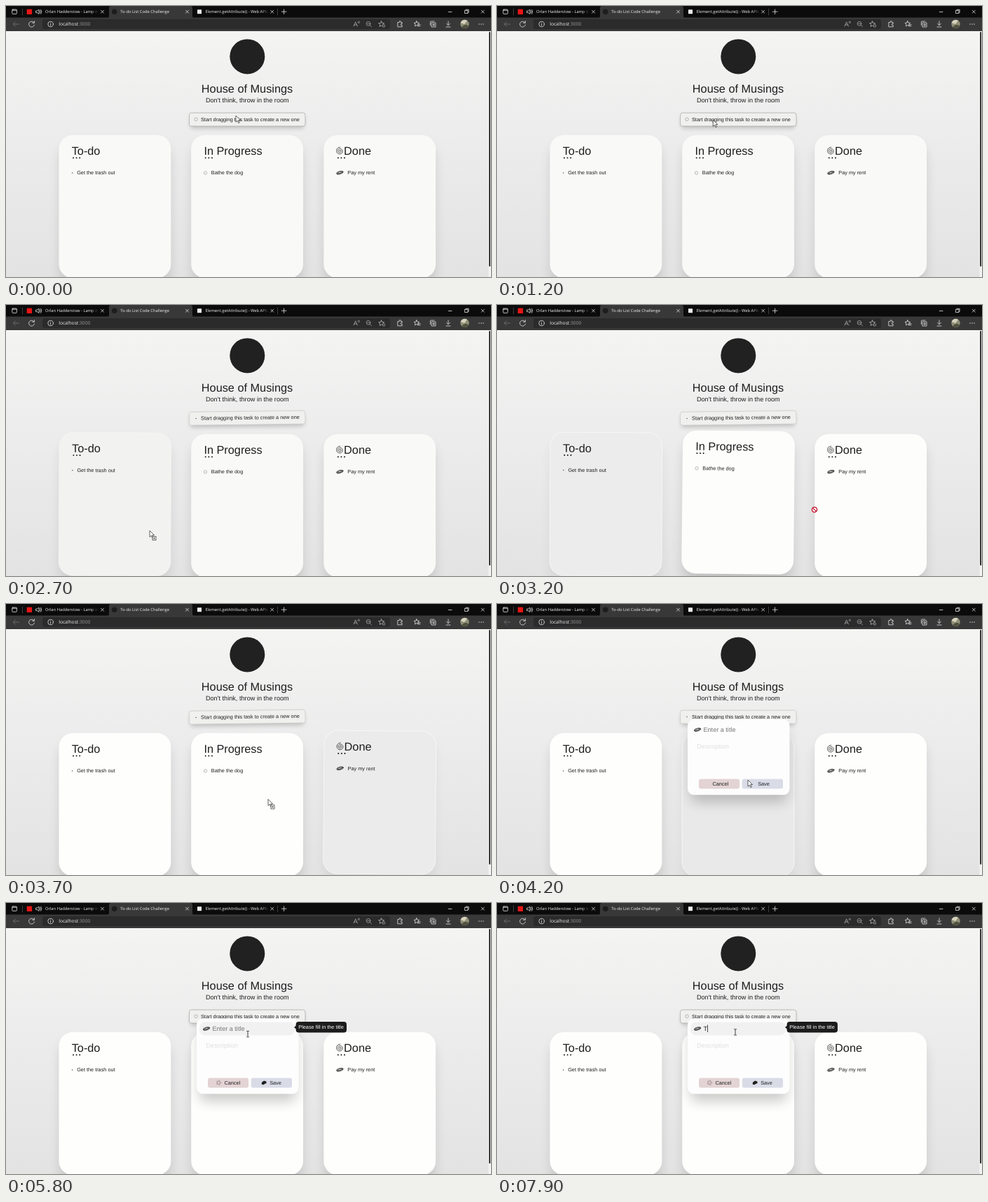
Write an HTML page that moves like this. It is 692 by 388 pixels and loops after 8000 ms.

```html
<!DOCTYPE html>
<html lang="en">
<head>
<meta charset="utf-8">
<title>To-do List Code Challenge</title>
<style>
  html, body { margin: 0; width: 100%; height: 100%; overflow: hidden; background: #eee; }
  #stage { display: block; width: 692px; height: 388px; }
  text { font-family: "Liberation Sans", Arial, sans-serif; fill: #1e1e1e; text-rendering: geometricPrecision; white-space: pre; }
  .ui text { font-family: "Open Sans", "Noto Sans", sans-serif; font-size: 5.8px; fill: #f2f2f2; }
  .line { fill: none; stroke: #e4e4e4; stroke-width: .8; stroke-linecap: round; stroke-linejoin: round; }
  .dim { stroke: #777; }
  .head { font-size: 16.3px; }
  .small { font-size: 7.3px; }
  .field { font-size: 9.1px; }
  .ring { fill: none; stroke: #8d8d8d; stroke-width: .6; }
  .ink { fill: none; stroke: #2a2a2a; stroke-width: .7; stroke-linecap: round; }
  .soft { filter: blur(9px); }
  .near { filter: blur(3px); }
</style>
</head>
<body>
<svg id="stage" viewBox="0 0 692 388" xmlns="http://www.w3.org/2000/svg">
  <defs>
    <linearGradient id="page" x2="0" y2="1">
      <stop stop-color="#f4f4f3"/><stop offset=".45" stop-color="#ececec"/><stop offset="1" stop-color="#e3e3e3"/>
    </linearGradient>
    <linearGradient id="fade"><stop stop-color="#0b0b0b" stop-opacity="0"/><stop offset="1" stop-color="#0b0b0b"/></linearGradient>
    <g id="cross"><path class="line" d="M-2-2L2 2M2-2L-2 2"/></g>
    <g id="oval" class="ink">
      <ellipse rx="4.9" ry="2" transform="rotate(-14)"/>
      <ellipse rx="4.2" ry="1.2" transform="rotate(-20)"/>
      <path d="M-3.6 1.3Q0 1.4 3.8-1.2"/>
    </g>
    <g id="dots"><circle cx="2" r=".95"/><circle cx="6.6" r=".95"/><circle cx="11.2" r=".95"/></g>
  </defs>

  <rect y="36" width="692" height="352" fill="url(#page)"/>
  <circle cx="344.3" cy="72.4" r="25" fill="#212121"/>
  <text class="head" x="344" y="124.3" text-anchor="middle">House of Musings</text>
  <text x="344.3" y="137.8" text-anchor="middle" font-size="9.17">Don't think, throw in the room</text>

  <g id="cards"></g>

  <g id="task">
    <rect class="near" x="263" y="157" width="162" height="18" rx="4" fill="#000" opacity=".2"/>
    <rect id="taskBox" x="261.5" y="153" width="165.5" height="19" rx="3" fill="#f0f1ef" stroke-width=".8"/>
    <circle id="taskRing" class="ring" cx="271" cy="162.2" r="2.3"/>
    <circle id="taskDot" cx="271" cy="162.4" r=".75" fill="#555"/>
    <text class="small" x="278" y="164.6">Start dragging this task to create a new one</text>
  </g>

  <g id="modal">
    <rect class="soft" x="276" y="180" width="138" height="104" rx="9" fill="#000" opacity=".2"/>
    <rect x="272" y="165.3" width="145.5" height="108" rx="9" fill="#fdfdfd"/>
    <rect id="pill" x="276" y="170.5" width="136" height="19" rx="8" fill="#f1f1f1"/>
    <use href="#oval" x="286" y="180"/>
    <text id="entry" class="field" x="294.5" y="183"></text>
    <rect id="caret" y="174.5" width=".8" height="10.5" fill="#222"/>
    <text class="field" x="285.3" y="207.3" style="fill:#dfdfdf">Description</text>
    <rect x="288" y="250.4" width="58" height="14" rx="3" fill="#e3d3d4"/>
    <rect x="349.7" y="250.4" width="58.3" height="14" rx="3" fill="#d9dce7"/>
    <text id="cancel" class="small" y="260">Cancel</text>
    <text id="save" class="small" y="260">Save</text>
    <g id="marks">
      <path id="spark" class="ink" transform="translate(303.4 257.3)" style="stroke:#695557;stroke-width:.6"/>
      <path d="M364.6 259.3C364.5 256 367 254.4 369.5 254.8C372 255.2 372.4 257.7 370.7 258.4C368.8 258.6 368 260.3 366.4 260.2Z" fill="#202020"/>
    </g>
  </g>

  <g id="tip">
    <path d="M411 178L414.5 175V181Z" fill="#1c1c1c"/>
    <rect x="413.6" y="170" width="72.4" height="15.4" rx="4" fill="#1c1c1c"/>
    <text class="small" x="417.3" y="180.4" style="fill:#fff">Please fill in the title</text>
  </g>

  <rect x="688.5" y="36" width="3.5" height="352" fill="#f3f3f3"/>
  <rect x="689.2" y="37" width="1.9" height="336" rx=".9" fill="#202020"/>

  <g class="ui">
    <rect width="692" height="17" fill="#0b0b0b"/>
    <rect y="16.5" width="692" height="19.5" fill="#383838"/>
    <path d="M145 17Q147 17 147 14V3Q147 0 150 0H263Q266 0 266 3V14Q266 17 268 17Z" fill="#383838"/>
    <rect x="52" y="19" width="496" height="14" rx="3" fill="#2b2b2b"/>

    <rect class="line" x="8.8" y="5" width="6.6" height="6.4" rx="1"/>
    <path class="line" d="M9 6.2H15" stroke-width="1.6"/>
    <path class="line dim" d="M23.5 4V13" opacity=".6"/>
    <rect x="29.7" y="4.6" width="7.4" height="7.4" fill="#e81616"/>
    <path class="line" d="M43 7H44.6L47 5V11.5L44.6 9.6H43ZM48.6 6.7Q49.8 8.2 48.6 9.8M49.8 5.2Q52 8.2 49.8 11.3"/>
    <svg x="56" width="76" height="17"><text y="10.2">Orlan Hadderstow - Lamp in Winter</text></svg>
    <rect x="121" width="11" height="16" fill="url(#fade)"/>
    <circle cx="154.7" cy="8.3" r="3.8" fill="#1d1d1d"/>
    <text x="163.3" y="10.2">To-do List Code Challenge</text>
    <rect x="273" y="5.2" width="6" height="6" fill="#f0f0f0"/>
    <svg x="284.5" width="90" height="17"><text y="10.2">Element.getAttribute() - Web APIs</text></svg>
    <rect x="364" width="11" height="16" fill="url(#fade)"/>
    <use href="#cross" x="137.5" y="8.2"/><use href="#cross" x="258.5" y="8.2"/><use href="#cross" x="379.7" y="8.2"/>
    <path class="line dim" d="M387.5 4V13" opacity=".6"/>
    <path class="line" d="M393.3 8.2H400M396.6 4.9V11.5M631.3 8.5H636M654.8 6.3H659V10.5H654.8ZM656 6.2V5.2H660.1V9.3H659.2"/>
    <use href="#cross" x="680.3" y="8.2"/>

    <path class="line dim" d="M18.5 26H10.3L13.5 22.8M10.3 26L13.5 29.2"/>
    <path class="line" d="M40 24A4 4 0 1 0 40.5 27M40.4 21.5V24.2H37.6" stroke-width="1"/>
    <circle class="line" cx="63.6" cy="26" r="3.8"/>
    <path class="line" d="M63.6 25.6V28M63.6 24V24.1"/>
    <text x="75.2" y="28.4" style="font-size:6.7px">localhost<tspan fill="#9a9a9a">:3000</tspan></text>
    <path class="line" d="M496 29L498.7 22.8L501.4 29M497 27H500.4M502.3 22.4Q503.2 23.2 502.3 24.2M503.8 21.8Q505 23.2 503.8 24.7" style="stroke:#aaa"/>
    <g style="opacity:.65"><circle class="line" cx="517" cy="25.3" r="2.9"/><path class="line" d="M519.2 27.5L521.6 29.8M515.6 25.3H518.4"/></g>
    <path class="line" id="star1" style="stroke:#bbb"/>
    <circle cx="539" cy="28.4" r="2.2" fill="#888"/><path class="line" d="M537.9 28.4H540.1M539 27.3V29.5" style="stroke:#222"/>
    <path class="line" d="M559.2 23.5H561.2Q560.6 21.5 562.2 21.5T563.3 23.5H565.2V25.4Q563.2 24.9 563.2 26.4T565.2 27.5V29.8H559.2Z"/>
    <path class="line" id="star2"/>
    <path class="line" d="M588.4 26.6H591M588 28.6H591"/>
    <path class="line" d="M605.4 27.5V22.8Q605.4 22 606.2 22H611M607.4 24H613V30H607.4ZM610.2 25.4V28.6M608.6 27H611.8"/>
    <path class="line" d="M631 21.8V27.4M628.5 25.2L631 27.7L633.5 25.2M628 30H634"/>
    <circle cx="654.5" cy="26" r="6.2" fill="#8f9077"/>
    <path d="M648.6 24A6.2 6.2 0 0 1 658 20.9L654 26Z" fill="#d6d2bd"/>
    <path d="M650 30.2Q655 24 660 28.7A6.2 6.2 0 0 1 650 30.2Z" fill="#51513f"/>
    <g fill="#e6e6e6"><circle cx="675" cy="26" r=".7"/><circle cx="678" cy="26" r=".7"/><circle cx="681" cy="26" r=".7"/></g>
  </g>

  <g id="pointer">
    <path id="arrow" d="M0 0V9.2L2.2 7.2L3.8 10.6L5.3 9.9L3.7 6.6H6.6Z" fill="#fff" stroke="#222" stroke-width=".7"/>
    <g id="copy">
      <path d="M0 0V9.2L2.2 7.2L3.8 10.6L5.3 9.9L3.7 6.6H6.6Z" fill="#fff" stroke="#222" stroke-width=".7"/>
      <rect x="4" y="8.3" width="5" height="5.4" fill="#eee" stroke="#333" stroke-width=".7"/>
      <path d="M5.2 11H7.8M6.5 9.7V12.3" stroke="#333" stroke-width=".6"/>
    </g>
    <g id="no" fill="#fff" stroke="#c4102c" stroke-width="1.3"><circle r="3.6"/><path d="M-2.4-2.4L2.4 2.4"/></g>
    <path id="beam" d="M-1.9-4.3H-.5L0-3.9L.5-4.3H1.9M0-3.9V3.7M-1.9 4.1H-.5L0 3.7L.5 4.1H1.9" fill="none" stroke="#222" stroke-width=".85"/>
  </g>
</svg>

<script>
const LOOP = 8000, STEP = 100;
const $ = id => document.getElementById(id);
const show = (id, on) => { $(id).style.display = on ? "" : "none"; };

// Linear look-up in rows of [time, ...values].
function at(rows, t) {
  let i = rows.findIndex(r => r[0] > t);
  if (i < 0) return rows[rows.length - 1].slice(1);
  if (i === 0) return rows[0].slice(1);
  const a = rows[i - 1], b = rows[i], k = (t - a[0]) / (b[0] - a[0]);
  return a.slice(1).map((v, j) => v + (b[j + 1] - v) * k);
}

const shade = (from, to, k) => `rgb(${from.map((v, i) => Math.round(v + (to[i] - v) * k))})`;

function star(x, y, r) {
  const p = Array.from({ length: 10 }, (_, i) => {
    const a = i * Math.PI / 5 - Math.PI / 2, q = i % 2 ? r * .48 : r;
    return (x + q * Math.cos(a)).toFixed(2) + " " + (y + q * Math.sin(a)).toFixed(2);
  });
  return "M" + p.join("L") + "Z";
}

function spiral(x, y, r, turns) {
  let d = "";
  for (let i = 0; i <= 60; i++) {
    const k = i / 60, a = k * turns * 2 * Math.PI + 1;
    d += (i ? "L" : "M") + (x + r * k * Math.cos(a)).toFixed(2) + " " + (y + r * k * Math.sin(a)).toFixed(2);
  }
  return d;
}

function rays(n) {
  let d = "";
  for (let i = 0; i < n; i++) {
    const a = i * 2 * Math.PI / n, c = Math.cos(a), s = Math.sin(a), r = i % 2 ? 1.6 : 2.4;
    d += `M${c * r} ${s * r}L${c * (r + 1.2)} ${s * (r + 1.2)}`;
  }
  return d;
}

$("star1").setAttribute("d", star(535.6, 26, 4.2));
$("star2").setAttribute("d", star(585.8, 25.6, 4));
$("spark").setAttribute("d", rays(10));

// Each card's keys: time, lift, turn in degrees, greyness.
const cards = [
  { x: 75.5, title: "To-do", item: "Get the trash out", textX: 101.2,
    icon: `<circle cx="94.6" cy="239" r=".8" fill="#555"/>`,
    keys: [[2600, 0, 0, 0], [2800, -4, .6, .9], [3100, -4, .5, 1], [3200, -2.2, .25, .85], [3500, 0, 0, 0]] },
  { x: 264.2, title: "In Progress", item: "Bathe the dog", textX: 292.8,
    icon: `<circle class="ring" cx="284.5" cy="239" r="2.2"/>`,
    keys: [[2900, 0, 0, 0], [3100, -4, .6, 0], [3200, -4.6, .6, 0], [3500, 0, 0, 0], [3700, 0, 0, 0],
           [3900, -4, .6, .85], [4000, -4, .6, 1], [4200, 0, 0, 1], [4300, 0, 0, .9], [4900, 0, 0, 0]] },
  { x: 453.3, title: "Done", item: "Pay my rent", textX: 487.3, indent: 10.6,
    icon: `<use href="#oval" x="476.3" y="238.7"/><path class="ink" style="stroke-width:.8" d="${spiral(476.4, 207.6, 5.4, 2.6)}"/>`,
    keys: [[3200, 0, 0, 0], [3400, -4, .6, .85], [3600, -4, .6, 1], [3700, -3, .4, .92], [4000, 0, 0, 0]] }
];

for (const c of cards) {
  const g = document.createElementNS("http://www.w3.org/2000/svg", "g");
  g.innerHTML = `
    <rect class="soft" x="${c.x + 3}" y="198" width="154" height="206" rx="20" fill="#000"/>
    <rect x="${c.x}" y="184.7" width="159.8" height="205" rx="20" stroke="#f8f8f8" stroke-width="1"/>
    <text class="head" x="${c.x + 18.2 + (c.indent || 0)}" y="213">${c.title}</text>
    <use href="#dots" x="${c.x + 18.5}" y="217.4"/>
    ${c.icon}
    <text class="small" x="${c.textX}" y="241.3">${c.item}</text>`;
  $("cards").append(g);
  c.node = g;
  [c.shadow, c.face] = g.querySelectorAll("rect");
}

const path = [
  [0, 328, 157], [100, 380, 165], [200, 472, 190], [300, 320, 170], [400, 232, 160], [700, 232, 160],
  [1500, 354, 165], [1700, 354, 165], [1800, 358, 168], [2100, 407, 212], [2400, 330, 280], [2600, 240, 318],
  [2800, 170, 328], [3000, 235, 318], [3100, 350, 305], [3200, 453, 293], [3400, 520, 286], [3600, 455, 281],
  [3700, 374, 279.5], [4000, 360, 258], [4200, 358, 252], [4800, 364, 256], [5000, 364, 256],
  [5600, 345, 189], [5700, 345, 189], [5800, 345, 187.7], [6000, 345, 187.7], [6600, 340, 182],
  [6800, 340, 182], [6900, 340, 185]
];
const kinds = [[0, "arrow"], [1800, "no"], [2600, "copy"], [3200, "no"], [3300, "copy"], [4200, "arrow"], [5400, "beam"]];
const taskKeys = [[1800, 0, 0], [1900, -.8, -.7], [4100, -.8, -.7], [4200, -.8, 0], [4500, 0, 0]];

function draw(t) {
  const [white] = at([[2700, 0], [3400, 1]], t);
  for (const c of cards) {
    const [lift, turn, grey] = at(c.keys, t);
    const base = [249 + 5 * white, 250 + 4 * white, 248 + 5 * white];
    c.node.setAttribute("transform", `translate(0 ${lift}) rotate(${turn} ${c.x + 80} 287)`);
    c.face.setAttribute("fill", shade(base, [233, 233, 233], grey));
    c.face.setAttribute("stroke-opacity", grey);
    c.shadow.setAttribute("opacity", .15 - .09 * grey);
  }

  const [shift, tilt] = at(taskKeys, t);
  const dragged = t >= 1800 && t < 4400;
  $("task").setAttribute("transform", `translate(0 ${shift}) rotate(${tilt} 344 162)`);
  $("taskBox").setAttribute("stroke", dragged ? "#cbcbc9" : "#aaaead");
  show("taskRing", !dragged);
  show("taskDot", dragged);

  show("modal", t >= 4200);
  const [hint] = at([[5000, 0], [5300, 1]], t);
  for (const id of ["pill", "marks", "tip"]) $(id).style.opacity = hint;
  $("cancel").setAttribute("x", 307.4 + 4 * hint);
  $("save").setAttribute("x", 372.2 + 4 * hint);

  const typed = t >= 7900;
  $("entry").textContent = typed ? "T" : "Enter a title";
  $("entry").style.fill = typed ? "#222" : "#757575";
  $("caret").setAttribute("x", typed ? 300 : 294.6);
  show("caret", (t >= 6600 && t < 7100) || t >= 7700);

  const [x, y] = at(path, t);
  const kind = kinds.filter(k => k[0] <= t).pop()[1];
  $("pointer").setAttribute("transform", `translate(${x} ${y})`);
  for (const id of ["arrow", "copy", "no", "beam"]) show(id, id === kind);
}

const start = performance.now();
function tick() {
  const t = (performance.now() - start) % LOOP;
  draw(Math.floor(t / STEP) * STEP);
  requestAnimationFrame(tick);
}
tick();
</script>
</body>
</html>
```
